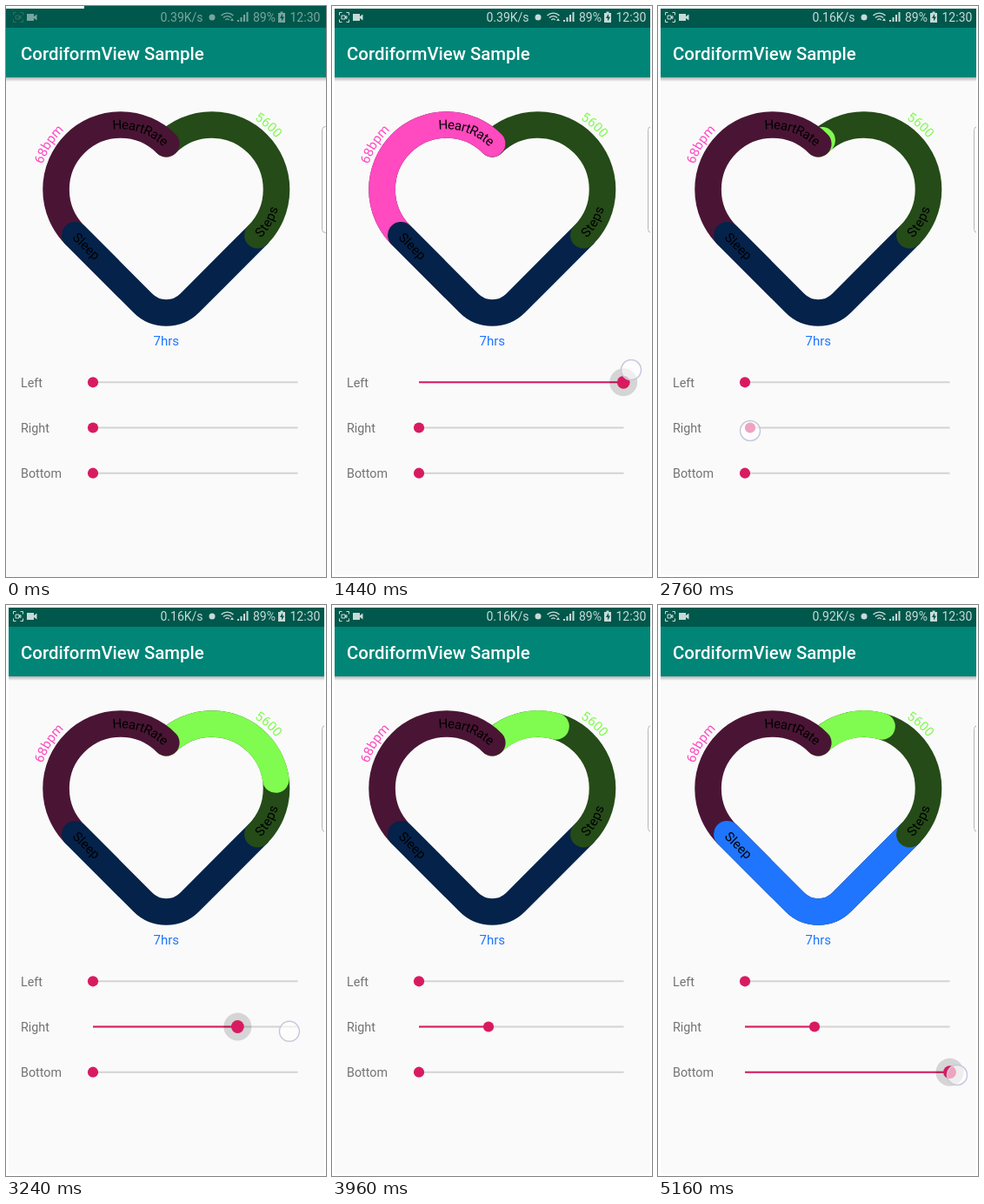
An HTML page that plays this animation: 368 px wide and 656 px high, repeating every 5280 ms.

```html
<!DOCTYPE html>
<html lang="en">
<head>
<meta charset="utf-8">
<title>CordiformView Sample</title>
<style>
  html, body { margin: 0; height: 100%; overflow: hidden; background: #fafafa; }
  svg { display: block; width: 368px; height: 656px; font-family: Roboto, sans-serif; }
  #heart { fill: none; stroke-width: 30.6; stroke-linecap: round; }
  #names { font-size: 15px; }
  #sliders { font-size: 14.3px; stroke-width: 2; }
  #status { font-size: 14px; fill: #fff; }
</style>
</head>
<body>
<svg viewBox="0 0 368 656">
  <defs id="defs">
    <clipPath id="leftHalf"><rect width="130" height="656"/></clipPath>
    <linearGradient id="shadow" x2="0" y2="1">
      <stop stop-opacity=".28"/>
      <stop offset="1" stop-opacity="0"/>
    </linearGradient>
  </defs>

  <rect width="368" height="656" fill="#fafafa"/>
  <rect y="82" width="368" height="5" fill="url(#shadow)"/>
  <rect width="368" height="82" fill="#008577"/>
  <rect width="368" height="25" fill="#00574b"/>
  <text x="17" y="62" font-size="20.4" font-weight="500" fill="#fff">CordiformView Sample</text>

  <g id="status">
    <g id="capture" fill="none" stroke="#fff" stroke-opacity=".8">
      <rect x="8.5" y="7.5" width="11" height="11" stroke-dasharray="3 5 3 0"/>
      <path d="M11 11h4v4h-4zM15 13l2-1.5v3z"/>
    </g>
    <g id="icons" opacity=".78">
      <path d="M24 9h8v3l3.5-2.5v7L32 14v3h-8z"/>
      <text id="rate" x="177.5" y="18"></text>
      <circle cx="237" cy="13" r="3.5"/>
      <path d="M260 14l2 3h-4z"/>
      <text x="284" y="18">89%</text>
      <path d="M315.5 6.5h3V8h2.5v11h-8V8h2.5z"/>
      <path d="M318 9l-3 5h2v3.5l3-5h-2z" fill="#00574b"/>
      <text x="326.5" y="18">12:30</text>
    </g>
  </g>

  <rect x="363.5" y="138.5" width="12" height="122" rx="4" fill="#fff" stroke="#b5b5b5"/>
  <g id="heart"></g>
  <g id="names"></g>
  <g id="sliders"></g>
  <circle id="touch" r="11.5" fill="#fff" fill-opacity=".6" stroke="#c6c8dc" stroke-width="1.5"/>
  <path id="frame" d="M0 1.5H367.5V655H1.5V0" pathLength="2044" fill="none" stroke="#fff" stroke-width="3"/>
</svg>

<script>
const LOOP = 5280, STEP = 120, TRACK = 100, TRACK_END = 335.5;
const CX = 184.3, CY = 210.7, HALF = 52.5;   // lobe centres sit at CX ± HALF
const $ = id => document.getElementById(id);

function set(node, attrs) {
  for (const key in attrs) node.setAttribute(key, attrs[key]);
  return node;
}
function add(parent, tag, attrs, text = '') {
  const node = document.createElementNS('http://www.w3.org/2000/svg', tag);
  $(parent).append(node);
  node.textContent = text;
  return set(node, attrs);
}
const show = on => on ? 'visible' : 'hidden';

// Each drag lists turning points [time, x, y]; the finger eases between them.
const parts = {
  left: {
    label: 'Left', name: 'HeartRate', color: '#ff4ac0', dark: '#4a1535',
    drag: [[720, 112, 433], [960, 129, 432], [1370, 344, 418], [1680, 344, 418], [2400, 92, 440]]
  },
  right: {
    label: 'Right', name: 'Steps', color: '#80fb50', dark: '#254b18',
    drag: [[2760, 106, 488], [3350, 348, 490], [3840, 180, 491]]
  },
  bottom: {
    label: 'Bottom', name: 'Sleep', color: '#1f75fe', dark: '#05224a',
    drag: [[4440, 107, 537], [4560, 121, 540], [5040, 344, 540]]
  }
};

function fingerAt(drag, t) {
  const i = drag.findIndex(p => p[0] >= t);
  if (i < 1) return drag.at(i);
  const a = drag[i - 1], b = drag[i], k = (t - a[0]) / (b[0] - a[0]);
  const ease = k * k * (3 - 2 * k);
  return a.map((v, n) => v + (b[n] - v) * ease);
}

// Half circle around a lobe; side is -1 (left) or 1 (right).
function lobe(side, radius, reverse = false) {
  const d = radius / Math.SQRT2, x = CX + side * HALF;
  const ends = [[x - d, CY - side * d], [x + d, CY + side * d]];
  if (side < 0 !== reverse) { /* left lobe starts at its lower left end */ }
  const [from, to] = reverse ? ends.reverse() : ends;
  return `M${from}A${radius} ${radius} 0 0 ${reverse ? 0 : 1} ${to}`;
}
const R = HALF * Math.SQRT2, low = CY + HALF, tip = 27;
const shapes = {
  left: lobe(-1, R),
  right: lobe(1, R),
  bottom: `M${CX + 2 * HALF} ${low}L${CX + tip} ${low + 2 * HALF - tip}` +
    `A38 38 0 0 1 ${CX - tip} ${low + 2 * HALF - tip}L${CX - 2 * HALF} ${low}`,
  stepsLine: lobe(1, R, true),
  sleepLine: `M${CX - 2 * HALF} ${low}l80 80`,
  leftOuter: lobe(-1, 94.2),
  rightOuter: lobe(1, 94.2)
};
for (const id in shapes) add('defs', 'path', { id, d: shapes[id] });

// Bottom is painted twice so that every segment's end overlaps its neighbour.
const arcs = ['bottom', 'right', 'left', 'bottom'].map((key, i) => {
  const clip = i === 3 ? { 'clip-path': 'url(#leftHalf)' } : {};
  const { dark, color } = parts[key], d = shapes[key];
  add('heart', 'path', { d, stroke: dark, ...clip });
  return { key, node: add('heart', 'path', { d, stroke: color, pathLength: 1, ...clip }) };
});

function textOn(path, text, offset, anchor, fill, dy) {
  const label = add('names', 'text', { 'text-anchor': anchor, fill, dy });
  label.id = path + 'Text';
  add(label.id, 'textPath', { href: '#' + path, startOffset: offset }, text);
}
textOn('left', parts.left.name, '100%', 'end', '#000', 5);
textOn('stepsLine', parts.right.name, 0, 'start', '#000', 5);
textOn('sleepLine', parts.bottom.name, 0, 'start', '#000', 5);
textOn('leftOuter', '68bpm', '42.8%', 'middle', parts.left.color, 0);
textOn('rightOuter', '5600', '48%', 'middle', parts.right.color, 0);
add('names', 'text', { x: CX, y: 389.5, 'text-anchor': 'middle', fill: parts.bottom.color }, '7hrs');

Object.values(parts).forEach((part, i) => {
  const y = part.y = 432.3 + 52.2 * i;
  add('sliders', 'text', { x: 17, y: y + 5.4, fill: '#737373' }, part.label);
  add('sliders', 'path', { d: `M${TRACK} ${y}H${TRACK_END}`, stroke: '#d3d3d3' });
  part.bar = add('sliders', 'path', { stroke: '#d81b60' });
  part.halo = add('sliders', 'circle', { cy: y, r: 16, 'fill-opacity': .15 });
  part.thumb = add('sliders', 'circle', { cy: y, fill: '#d81b60' });
});

for (let i = 0; i < 4; i++) {
  const height = 2 + 3 * i;
  add('icons', 'rect', { x: 266 + 3.5 * i, y: 18 - height, width: 2, height });
}
for (const r of [3, 6.5, 10]) {
  const d = r * .7;
  add('icons', 'path', {
    d: `M${254.5 - d} ${18 - d}A${r} ${r} 0 0 1 ${254.5 + d} ${18 - d}`,
    fill: 'none', stroke: '#fff', 'stroke-width': 1.4
  });
}

function render(time) {
  const t = Math.floor(time % LOOP / STEP) * STEP;
  const wake = Math.min(1, t / 360);
  set($('status'), { opacity: .6 + .4 * wake });
  set($('capture'), { opacity: .35 + .65 * wake });
  set($('frame'), { 'stroke-dasharray': `${90 + 274 * t / STEP} 4000` });
  $('rate').textContent = (t < 2160 ? '0.39' : t < 4080 ? '0.16' : '0.92') + 'K/s';
  set($('touch'), { visibility: 'hidden' });

  for (const part of Object.values(parts)) {
    const { drag, y, bar, halo, thumb } = part, start = drag[0][0];
    const down = t >= start && t <= Math.ceil(drag.at(-1)[0] / STEP) * STEP + (part === parts.bottom ? STEP : 0);
    const pressed = down && t >= start + 3 * STEP;
    // The thumb trails the finger by one step.
    const trail = fingerAt(drag, t - STEP)[1];
    const x = t < start ? TRACK : Math.max(TRACK, Math.min(TRACK_END, trail));
    part.value = (x - TRACK) / (TRACK_END - TRACK);
    set(bar, { d: `M${TRACK} ${y}H${x}` });
    set(thumb, { cx: x, r: pressed ? 7.4 : 6.1 });
    set(halo, { cx: x, visibility: show(pressed) });
    if (down) {
      const [, cx, cy] = fingerAt(drag, t);
      set($('touch'), { cx, cy, visibility: 'visible' });
    }
  }
  for (const { key, node } of arcs) {
    const { value } = parts[key];
    set(node, { 'stroke-dasharray': `${value} 3`, visibility: show(value > 0) });
  }
}

const begin = performance.now();
function tick() {
  render(performance.now() - begin);
  requestAnimationFrame(tick);
}
tick();
</script>
</body>
</html>
```
